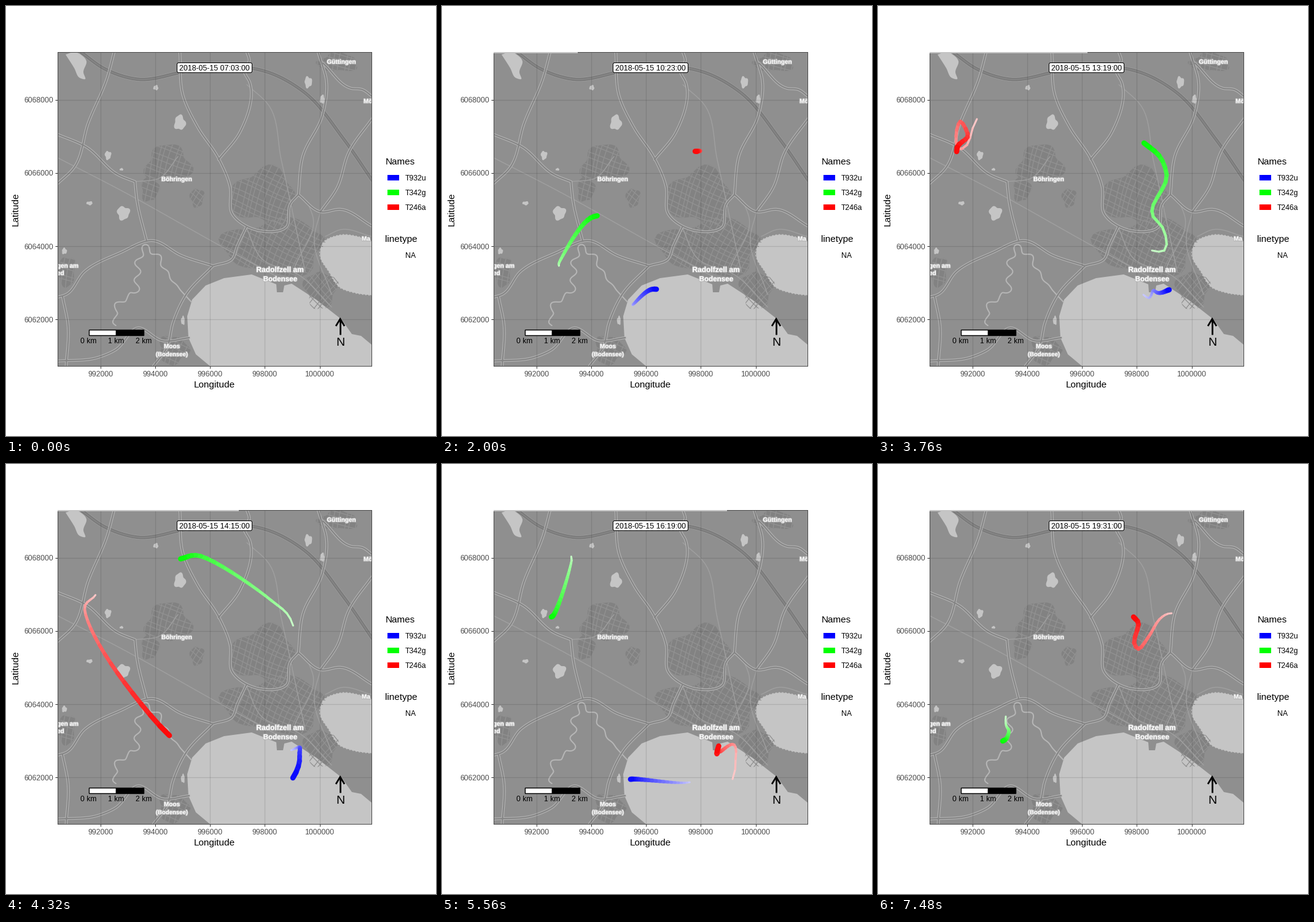
Recreate the animation shown at these times as a matplotlib script. Size 700 by 700 pixels, loop 7520 ms.

```python
import numpy as np
import matplotlib.pyplot as plt
from matplotlib.animation import FuncAnimation
from matplotlib.collections import LineCollection
from matplotlib.patches import FancyBboxPatch, Polygon, Rectangle
from matplotlib.patheffects import withStroke

SIZE, DPI, FRAMES, STEP = 700, 100, 188, 40
LEFT, TOP, RIGHT, BOTTOM = 84, 75, 595, 586
TAIL = 19
PX = 72 / DPI
rng = np.random.default_rng(4)

plt.rcParams["font.family"] = "Liberation Sans"
fig = plt.figure(figsize=(SIZE / DPI, SIZE / DPI), dpi=DPI, facecolor="white")
ax = fig.add_axes([LEFT / SIZE, 1 - BOTTOM / SIZE,
                   (RIGHT - LEFT) / SIZE, (BOTTOM - TOP) / SIZE])
ax.set(xlim=(LEFT, RIGHT), ylim=(BOTTOM, TOP), facecolor="#8f8f8f")


def hermite(t, p, s):
    """Cubic curve through points p at times t, read at times s."""
    t, p, s = (np.asarray(v, float) for v in (t, p, s))
    m = np.gradient(p, t, axis=0)
    k = np.clip(np.searchsorted(t, s, side="right") - 1, 0, len(t) - 2)
    h = (t[k + 1] - t[k])[:, None]
    u = (s[:, None] - t[k][:, None]) / h
    return ((1 + 2 * u) * (1 - u) ** 2 * p[k] + u * (1 - u) ** 2 * h * m[k]
            + u * u * (3 - 2 * u) * p[k + 1] + u * u * (u - 1) * h * m[k + 1])


def smooth(*pts, n=10):
    p = np.array(pts, float)
    t = np.r_[0, np.cumsum(np.hypot(*np.diff(p, axis=0).T))]
    return hermite(t, p, np.linspace(0, t[-1], n * len(p)))


def lines(paths, color, width, z):
    c = LineCollection(paths, colors=color, linewidths=width * PX, zorder=z,
                       capstyle="round", joinstyle="round")
    ax.add_collection(c, autolim=False)
    return c


def area(pts, color, **kw):
    return ax.add_patch(Polygon(pts, facecolor=color, zorder=1, **kw))


def blob(x, y, rx, ry):
    """Closed uneven outline around a centre."""
    a = np.linspace(0, 2 * np.pi, 40)
    r = 1 + 0.12 * np.sin(3 * a + x) + 0.1 * np.sin(5 * a + y)
    return np.c_[x + rx * r * np.cos(a), y + ry * r * np.sin(a)]


def town(x, y, rx, ry, angle):
    """Built-up area with a loose street grid."""
    patch = area(blob(x, y, rx, ry), "#828282")
    reach = 1.3 * max(rx, ry)
    s = np.linspace(-reach, reach, 30)
    grid = []
    for a in np.radians([angle, angle + 90]):
        u, v = np.array([np.cos(a), np.sin(a)]), np.array([-np.sin(a), np.cos(a)])
        for o in np.arange(-reach, reach, 9):
            w = o + rng.uniform(-2, 2) + 3 * np.sin(s / 25 + a + o / 40)
            grid.append(np.array([x, y]) + s[:, None] * u + w[:, None] * v)
    lines(grid, "#929292", 1.3, 1.1).set_clip_path(patch)


def label(x, y, text, px, ha="left", **kw):
    return fig.text(x / SIZE, 1 - y / SIZE, text, fontsize=px * PX,
                    ha=ha, va="baseline", **kw)


def place(x, y, text, px=10, ha="center"):
    ax.text(x, y, text, fontsize=px * PX, color="white", weight="bold", ha=ha,
            va="baseline", clip_on=True, zorder=3,
            path_effects=[withStroke(linewidth=2 * PX, foreground="#b4b4b4")])


town(264, 258, 36, 31, 15)
town(234, 298, 14, 20, 15)
town(311, 312, 11, 15, 35)
town(420, 310, 52, 44, 20)
town(438, 392, 82, 44, 25)
town(512, 462, 26, 30, 45)
town(540, 92, 32, 15, 10)
town(272, 560, 24, 23, 20)
town(98, 432, 15, 24, 10)

# Water
WATER = "#c5c5c5"
area([(295, 505), (303, 478), (325, 455), (355, 443), (400, 437), (440, 453),
      (441, 466), (451, 466), (453, 455), (465, 452), (505, 478), (546, 510),
      (563, 534), (578, 537), (596, 552), (596, 587), (333, 587), (309, 567),
      (297, 540)], WATER)
area(smooth((596, 384), (575, 376), (543, 373), (515, 387), (511, 405), (526, 433),
            (542, 457), (568, 467), (596, 471)), WATER,
     edgecolor=WATER, linestyle=":", linewidth=2 * PX)
area(smooth((97, 79), (112, 75), (131, 90), (126, 108), (129, 119), (120, 117),
            (111, 101), (97, 79)), WATER)
for pond in ((283, 190, 9, 12), (191, 337, 10, 11), (244, 133, 4, 4), (492, 124, 6, 9),
             (515, 152, 4, 7), (136, 321, 5, 3), (166, 243, 5, 7), (188, 266, 3, 2),
             (288, 512, 3, 7), (95, 399, 4, 5)):
    area(blob(*pond), WATER)

# River: a bent line with meanders
mid = smooth((302, 482), (281, 459), (262, 434), (245, 405), (228, 393), (216, 412),
             (214, 440), (209, 468), (190, 478), (177, 497), (180, 520), n=18)
d = np.gradient(mid, axis=0)
run = np.cumsum(np.hypot(*d.T))
sway = 5 * np.sin(run / 4.5) * np.clip(run / 80 - 0.3, 0, 1)
normal = np.c_[-d[:, 1], d[:, 0]] / np.hypot(*d.T)[:, None]
lines([mid + sway[:, None] * normal], "#b6b6b6", 2, 1.5)


# Roads and railways
def road(*pts):
    path = [smooth(*pts)]
    lines(path, "#b4b4b4", 4.4, 1.9)
    lines(path, "#858585", 2.2, 1.91)


def street(*pts, color="#a0a0a0"):
    lines([smooth(*pts)], color, 1.4, 1.7)


street((84, 247), (185, 299), (350, 391), (440, 440))
street((392, 128), (428, 162), (448, 250), (487, 432))
street((520, 375), (545, 364), (595, 375))
street((490, 318), (500, 345), (470, 425))
street((391, 360), (415, 410), (480, 440), (530, 490))
street((512, 335), (502, 375), (530, 470))
street((210, 286), (250, 280), (280, 245))

motorway = [smooth((122, 75), (160, 102), (212, 119), (300, 105), (370, 98),
                   (430, 109), (485, 140), (550, 217), (597, 285))]
for color, width, z in (("#a0a0a0", 7, 1.8), ("#7b7b7b", 5.6, 1.81), ("#8c8c8c", 1, 1.82)):
    lines(motorway, color, width, z)

road((176, 75), (165, 116), (134, 190), (110, 264), (84, 289))
road((84, 209), (130, 229), (183, 275), (210, 286))
road((210, 286), (213, 315), (229, 383))
road((84, 474), (97, 470), (128, 432), (185, 402), (240, 382), (285, 406), (337, 423))
road((337, 423), (369, 411), (376, 392), (391, 360))
road((337, 423), (293, 470), (272, 515), (262, 556), (240, 586))
road((92, 473), (101, 520), (98, 586))
road((84, 578), (150, 572), (178, 560), (215, 524), (255, 545), (298, 540))
road((283, 75), (288, 145), (312, 197), (346, 248), (365, 295), (368, 338),
     (402, 363), (457, 359), (463, 322), (476, 307))
road((392, 75), (396, 88), (388, 105), (397, 125), (381, 205), (346, 250))
road((508, 75), (522, 125), (515, 178), (483, 245), (476, 307))
road((476, 307), (512, 335), (545, 331), (597, 359))
road((512, 335), (539, 296), (558, 238), (597, 182))
road((516, 93), (562, 134), (580, 136), (597, 148))

place(546, 94, "Güttingen")
place(278, 285, "Böhringen")
place(446.5, 433, "Radolfzell am", 12)
place(446.5, 448, "Bodensee", 11.6)
place(270, 557, "Moos")
place(270, 570, "(Bodensee)", 9.6)
place(118, 426, "gen am", ha="right")
place(83, 438, "ed", ha="left")
place(582, 158, "Mö", ha="left")
place(579, 382, "Ma", ha="left")

# Axes
ax.set_xticks(153.5 + 89.27 * np.arange(5),
              [str(v) for v in range(992000, 1000001, 2000)])
ax.set_yticks(152.5 + 119.33 * np.arange(4),
              [str(v) for v in range(6068000, 6061999, -2000)])
ax.tick_params(length=3.8 * PX, width=PX, color="#333333", labelsize=8.8,
               labelcolor="#4d4d4d")
ax.tick_params(axis="x", pad=4.2 * PX)
ax.tick_params(axis="y", pad=3 * PX)
ax.grid(color="black", alpha=0.11, linewidth=1.3 * PX)
ax.set_axisbelow(False)
for side in ax.spines.values():
    side.set(color="#4a4a4a", linewidth=PX, zorder=8)
label(339.5, 621, "Longitude", 15.28, ha="center")
label(20, 331, "Latitude", 15.28, ha="center", rotation=90, rotation_mode="anchor")

# Scale bar and north arrow
for x, color in ((134.5, "white"), (179.2, "black")):
    ax.add_patch(Rectangle((x, 527), 44.8, 8.5, facecolor=color, edgecolor="black",
                           linewidth=1.4 * PX, zorder=4))
for k in range(3):
    label(134 + 45 * k, 549, f"{k} km", 12.1, ha="center")
for xs, ys in (([544, 544], [535, 509]), ([537, 544, 551], [521, 509.5, 521])):
    ax.plot(xs, ys, color="black", lw=2.7 * PX, zorder=4,
            solid_capstyle="butt", solid_joinstyle="miter")
label(544, 553, "N", 19.5, ha="center")

# Legend
label(617.5, 258, "Names", 15.28)
for k, (name, color) in enumerate((("T932u", "#0000ff"), ("T342g", "#00ff00"),
                                   ("T246a", "#ff0000"))):
    y = 279.5 + 24 * k
    fig.add_artist(Rectangle((620.5 / SIZE, 1 - (y + 4.4) / SIZE), 19.5 / SIZE,
                             8.8 / SIZE, color=color, linewidth=0))
    label(650, y + 4.5, name, 12.22)
label(617.5, 384, "linetype", 15.28)
label(650, 410.5, "NA", 12.22)

# Time stamp and progress line
ax.add_patch(FancyBboxPatch((281, 95), 117, 11, boxstyle="round,pad=2.5,rounding_size=2.5",
                            facecolor="white", edgecolor="black", linewidth=PX, zorder=9))
stamp = ax.text(339.5, 105, "", fontsize=12.35 * PX, ha="center", va="baseline", zorder=10)
bar, = ax.plot([], [], color="#c4c4c4", lw=2 * PX, zorder=9, solid_capstyle="butt")

# Track points: step, x, y
RED = [(44, 420, 236), (52, 405, 235), (59, 353, 219), (61, 337, 205), (65, 314, 161),
       (67, 278, 132), (71, 220, 140), (75, 161, 184), (78, 145, 226), (80, 130, 233),
       (82, 127, 212), (85, 134, 188), (88, 146, 208), (94, 128, 237), (103, 193, 356),
       (108, 266, 442), (112, 328, 490), (115, 397, 513), (118, 442, 529),
       (120, 473, 513), (122, 478, 480), (132, 452, 468), (138, 448, 467),
       (143, 461, 416), (146, 445, 404), (149, 473, 393), (151, 511, 387),
       (154, 541, 367), (155, 537, 357), (157, 553, 323), (168, 478, 243),
       (172, 458, 253), (176, 440, 282), (179, 424, 301), (181, 417, 291),
       (184, 424, 261), (187, 416, 249)]
GREEN = [(0, 200, 470), (11, 193, 455), (17, 181, 444), (20, 184, 438), (23, 184, 428),
         (30, 190, 424), (36, 192, 415), (48, 242, 345), (52, 263, 337), (55, 276, 321),
         (61, 316, 332), (67, 349, 346), (75, 446, 398), (77, 466, 398), (78, 470, 388),
         (80, 463, 360), (82, 448, 343), (83, 446, 334), (88, 470, 275), (90, 463, 252),
         (94, 433, 223), (103, 317, 150), (109, 277, 155), (113, 241, 151),
         (114, 235, 154), (116, 231, 143), (119, 212, 148), (122, 211, 157),
         (138, 180, 248), (142, 174, 250), (147, 184, 263), (152, 202, 277),
         (157, 233, 280), (168, 208, 411), (177, 213, 436), (182, 209, 447),
         (187, 203, 451)]
BLUE = [(0, 298, 517), (4, 303, 505), (11, 316, 484), (20, 311, 485), (30, 310, 487),
        (36, 312, 485), (48, 343, 461), (54, 361, 465), (58, 371, 475), (60, 376, 475),
        (62, 381, 468), (65, 391, 460), (67, 402, 465), (75, 432, 470), (76, 437, 474),
        (82, 449, 463), (84, 453, 466), (94, 474, 462), (98, 478, 461), (103, 478, 470),
        (106, 476, 492), (108, 467, 511), (111, 446, 521), (114, 425, 524),
        (118, 411, 518), (122, 395, 519), (138, 309, 513), (145, 301, 516),
        (157, 296, 520), (166, 296, 519)]


class Track:
    def __init__(self, keys, rgb, z):
        keys = np.array(keys)
        self.start, self.end = keys[0, 0], keys[-1, 0]
        steps = np.arange(self.start, self.end + 1)
        self.path = hermite(keys[:, 0], keys[:, 1:], steps)
        self.rgb = np.array(rgb, float)
        self.art = lines([], "black", 1, z)

    def draw(self, i):
        first = max(self.start, i - TAIL)
        k = np.arange(first, min(i, self.end))
        self.art.set_visible(len(k) > 0)
        if len(k) == 0:
            return
        age = (i - k) / TAIL
        p = self.path
        self.art.set_segments([p[j:j + 2] for j in k - self.start])
        self.art.set_linewidths((8.9 - 5.9 * age) * PX)
        self.art.set_color(self.rgb + (1 - self.rgb) * 0.78 * age[:, None])


tracks = [Track(RED, (1, 0, 0), 5), Track(GREEN, (0, 1, 0), 6), Track(BLUE, (0, 0, 1), 7)]


def update(i):
    for track in tracks:
        track.draw(i)
    hour, minute = divmod(7 * 60 + 3 + 4 * i, 60)
    stamp.set_text(f"2018-05-15 {hour:02d}:{minute:02d}:00")
    bar.set_data([LEFT, LEFT + (RIGHT - LEFT) * i / (FRAMES - 1)], [76, 76])
    return [t.art for t in tracks] + [stamp, bar]


anim = FuncAnimation(fig, update, frames=FRAMES, interval=STEP, repeat=True)
plt.show()
```
